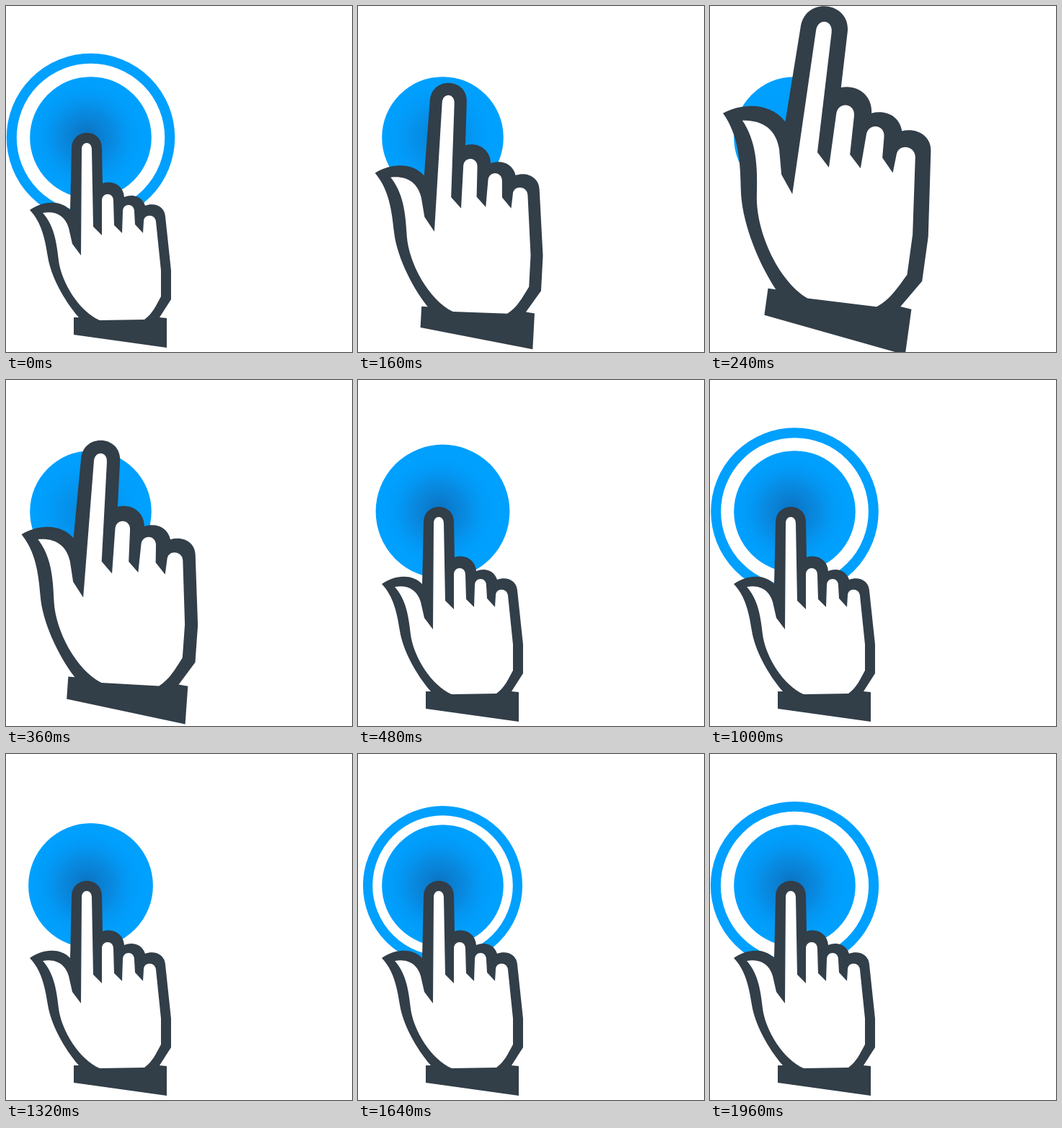
Animation, 480 px wide and 480 px high, one loop 2 s. Source, as an HTML page:

```html
<!DOCTYPE html>
<html lang="en">
<head>
<meta charset="utf-8">
<title>Tap</title>
<style>
  html, body { margin: 0; height: 100%; overflow: hidden; background: #fff; }
  svg { display: block; width: 100vw; height: 100vh; }
</style>
</head>
<body>
<svg viewBox="0 0 480 480">
  <defs>
    <radialGradient id="shade" gradientUnits="userSpaceOnUse" cx="112" cy="182" r="84">
      <stop offset="0" stop-color="#0c70bd"/>
      <stop offset=".45" stop-color="#0a84d9" stop-opacity=".75"/>
      <stop offset="1" stop-color="#00a0ff" stop-opacity="0"/>
    </radialGradient>
  </defs>
  <circle id="ring" cx="117.5" cy="182.5" fill="none" stroke="#00a0ff"/>
  <circle cx="117.5" cy="182.5" r="84.3" fill="#00a0ff"/>
  <circle id="shadow" cx="117.5" cy="182.5" r="84.3" fill="url(#shade)"/>
  <g id="hand">
    <path fill="#323e48" d="M33 283C50 271 74 268 89 283L91 198C91 169 133 169 133 197L134 246
      C149 241 163 250 164 265C176 260 189 264 193 277C206 272 220 278 221 292L229 367V407L213 432
      L223 433V474L94 456V432H101C80 408 62 374 58 348C54 322 49 300 33 283Z"/>
    <path fill="#fff" d="M51 287C69 284 82 291 87 308L92 330L104 346L105 199C105 187 119 187 119 199
      L121 306L133 318V270C133 258 149 258 149 270L150 304L161 315L162 285C162 273 178 273 178 285
      L179 303L190 315L191 299C191 288 207 288 208 299L215 367V403C208 416 203 427 192 435L130 436
      C102 424 77 384 73 353C70 325 66 304 51 287Z"/>
  </g>
</svg>
<script>
const LOOP = 2000, STEP = 40, GROW = 800;
const [ring, shadow, hand] = ["ring", "shadow", "hand"].map(id => document.getElementById(id));
const clamp = x => Math.min(1, Math.max(0, x));
const part = (t, from, to) => clamp((t - from) / (to - from));

// 0 = finger on the button, 1 = fully raised
function lift(t) {
  const up = (1 - Math.cos(Math.PI * part(t, 90, 255))) / 2;
  return up - part(t, 255, 405) ** 2;
}

// Time since the current ring started; negative when there is none
function ringAge(t) {
  if (t < 100) t += LOOP;
  if (t >= 1300) return t - 1300;
  return t < 1200 ? t - 400 : -1;
}

function draw(now) {
  const t = Math.floor(now % LOOP / STEP) * STEP;

  const age = ringAge(t);
  const outer = 116.8 - 32.8 * (1 - clamp(age / GROW)) ** 3;
  const width = outer * 0.12;
  ring.setAttribute("visibility", age < 0 ? "hidden" : "visible");
  ring.setAttribute("r", outer - width / 2);
  ring.setAttribute("stroke-width", width);

  const v = lift(t);
  shadow.setAttribute("opacity", 1 - 0.9 * v);
  hand.setAttribute("transform",
    `translate(${130 + v} ${456 - 20 * v}) rotate(${8 * v}) scale(${1 + 0.57 * v}) translate(-130 -456)`);
}

const start = performance.now();
(function tick() {
  draw(performance.now() - start);
  requestAnimationFrame(tick);
})();
</script>
</body>
</html>
```
